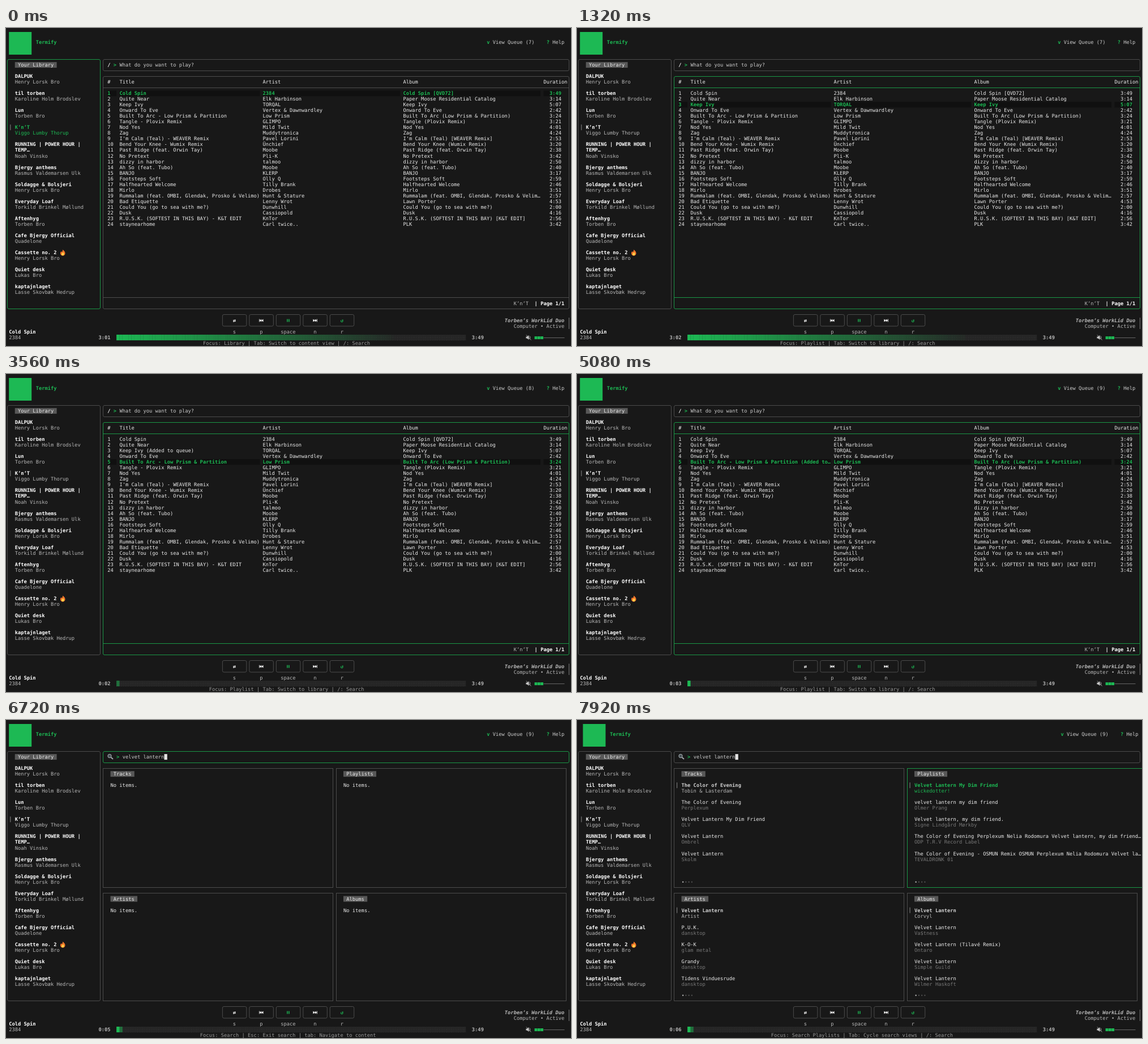
Write an HTML page that moves like this. It is 998 px wide and 561 px high and loops after 8000 ms.

```html
<!DOCTYPE html>
<html lang="en">
<head>
<meta charset="utf-8">
<title>Terminal music player</title>
<style>
html, body { margin: 0; width: 100%; height: 100%; overflow: hidden; background: #181818; }
svg { display: block; width: 998px; height: 561px; }
text { font: 8.762px "DejaVu Sans Mono", monospace; white-space: pre; text-rendering: geometricPrecision; }
.b { font-weight: bold; }
.i { font-weight: bold; font-style: italic; }
</style>
</head>
<body>
<svg id="stage" viewBox="0 0 998 561"></svg>
<script>
const LOOP = 8000, CELL = 5.275, LINE = 10.018;
const GREEN = '#1db954', WHITE = '#fff', TEXT = '#ececec', SOFT = '#b8b8b8', DIM = '#777', BACK = '#181818';
const EDGE = '#4c4c4c', ACTIVE_EDGE = '#1a9646';

// Library: title | owner; a slash breaks a long title
const library = `DALPUK;Henry Lorsk Bro
til torben;Karoline Holm Brodslev
Lun;Torben Bro
K’n’T;Viggo Lumby Thorup
RUNNING | POWER HOUR |/TEMP…;Noah Vinsko
Bjergy anthems;Rasmus Valdemarsen Ulk
Soldagge & Bolsjeri;Henry Lorsk Bro
Everyday Loaf;Torkild Brinkel Møllund
Aftenhyg;Torben Bro
Cafe Bjergy Official;Quadelone
Cassette no. 2;Henry Lorsk Bro
Quiet desk;Lukas Bro
kaptajnlaget;Lasse Skovbæk Hedrup`.split('\n').map(l => l.split(';'));

// Title; artist; album (blank = same as title); duration
const tracks = `Cold Spin;2384;Cold Spin [QVD72];3:49
Quite Near;Elk Harbinson;Paper Moose Residential Catalog;3:14
Keep Ivy;TORQAL;;5:07
Onward To Eve;Vertex & Dawnwardley;;2:42
Built To Arc - Low Prism & Partition;Low Prism;Built To Arc (Low Prism & Partition);3:24
Tangle - Plovix Remix;GLIMPO;Tangle (Plovix Remix);3:21
Nod Yes;Mild Twit;;4:01
Zag;Muddytronica;;4:24
I'm Calm (Teal) - WEAVER Remix;Pavel Lorini;I'm Calm (Teal) [WEAVER Remix];2:53
Bend Your Knee - Wumix Remix;Ünchief;Bend Your Knee (Wumix Remix);3:20
Past Ridge (feat. Orwin Tay);Moobe;;2:38
No Pretext;Pli-K;;3:42
dizzy in harbor;talmoo;;2:50
Ah So (feat. Tubo);Moobe;;2:40
BANJO;KLERP;;3:17
Footsteps Soft;Olly Q;;2:59
Halfhearted Welcome;Tilly Brank;;2:46
Mirlo;Drobes;;3:51
Rummalam (feat. OMBI, Glendak, Prosko & Velimo);Hunt & Stature;;2:57
Bad Etiquette;Lenny Wrot;Lawn Porter;4:53
Could You (go to sea with me?);Dunwhill;;2:00
Dusk;Cassiopold;;4:16
R.U.S.K. (SOFTEST IN THIS BAY) - K&T EDIT;KnTor;R.U.S.K. (SOFTEST IN THIS BAY) [K&T EDIT];2:56
staynearhome;Carl twice..;PLK;3:42`.split('\n').map(l => l.split(';'));

const query = 'velvet lantern';
const panels = [
  { name: 'Tracks', col: 32, row: 8, end: 29, items: `The Color of Evening;Tobin & Lasterdam
The Color of Evening;Perplexum
Velvet Lantern My Dim Friend;QLV
Velvet Lantern;Ombrel
Velvet Lantern;Skolm` },
  { name: 'Playlists', col: 110, row: 8, end: 29, items: `Velvet Lantern My Dim Friend;wickedotter!
velvet lantern my dim friend;Olmer Prang
Velvet lantern, my dim friend.;Signe Lindgård Mørkby
The Color of Evening Perplexum Nelia Rodomura Velvet lantern, my dim friend…;ODP T.R.V Record Label
The Color of Evening - OSMUN Remix OSMUN Perplexum Nelia Rodomura Velvet la…;TEVALDRONK 01` },
  { name: 'Artists', col: 32, row: 30, end: 49, items: `Velvet Lantern;Artist
P.U.K.;dansktop
K-O-K;glam metal
Grandy;dansktop
Tidens Vinduesrude;dansktop` },
  { name: 'Albums', col: 110, row: 30, end: 49, items: `Velvet Lantern;Corvyl
Velvet Lantern;Va$tness
Velvet Lantern (Tilavé Remix);Ontaro
Velvet Lantern;Simple Guild
Velvet Lantern;Wilmer Haskoft` }
];

// Values that hold from a given time on
const selectedAt = [[0, 1], [1240, 2], [1320, 3], [3280, 4], [3360, 5]];
const queueAt = [[0, 7], [2640, 8], [4600, 9]];
const playedAt = [[0, 181], [920, 182], [1800, 0], [2600, 1], [3560, 2], [4520, 3], [5520, 4], [6400, 5], [7280, 6]];
const focusAt = [[0, 'Library'], [200, 'Playlist'], [5320, 'Search'], [7840, 'Tracks'], [7920, 'Playlists']];
const valueAt = (steps, t) => steps.filter(s => s[0] <= t).pop()[1];

const burst = (t, start, count) => Math.max(0, Math.min(count, Math.floor((t - start) / 80) + 1));
const typedAt = t => burst(t, 5520, 7) + burst(t, 6160, 4) + burst(t, 6560, 3);

const x = col => 5.2 + col * CELL;
const y = row => 5 + row * LINE;
const escape = s => s.replace(/&/g, '&amp;').replace(/</g, '&lt;').replace(/>/g, '&gt;');
const clip = (s, n) => s.length > n ? s.slice(0, n - 1) + '…' : s;
const clock = s => `${Math.floor(s / 60)}:${String(s % 60).padStart(2, '0')}`;

const text = (col, row, s, fill = TEXT, cls = '', more = '') =>
  `<text x="${x(col).toFixed(2)}" y="${(y(row) + 3.1).toFixed(2)}" fill="${fill}" class="${cls}" ${more}>${escape(s)}</text>`;
const fillCells = (col, row, n, fill, opacity = 1) =>
  `<rect x="${x(col)}" y="${y(row) - 5}" width="${n * CELL}" height="10" fill="${fill}" opacity="${opacity}"/>`;
const box = (x1, y1, x2, y2, active, r = 2.5) =>
  `<rect x="${x1}" y="${y1}" width="${x2 - x1}" height="${y2 - y1}" rx="${r}" fill="none" stroke="${active ? ACTIVE_EDGE : EDGE}"/>`;
const line = (x1, y1, x2, y2, stroke) => `<path d="M${x1} ${y1}L${x2} ${y2}" stroke="${stroke}"/>`;
const marker = (col, row) => line(x(col + .5), y(row) - 5, x(col + .5), y(row) + 5, '#888');
const badge = (col, row, s) => fillCells(col, row, s.length + 2, '#585858') + text(col + 1, row, s);

const defs = `<defs><pattern id="hatch" width="2.6375" height="2.5" patternUnits="userSpaceOnUse">
<path d="M0 0h.9v.8h-.9zM1.3 1.25h.9v.8h-.9z" fill="#555"/></pattern></defs>`;
const flame = `<path d="M100 391c3 2 4.5 4 4.5 6.5a4 4 0 0 1-8.5 0c0-1.5.6-2.6 1.6-3.5l.8 1.5c1.3-1.2 1.9-2.7 1.6-4.5z" fill="#f5762a"/>
<path d="M100.5 395.5c1.5 1.4 2.2 2.4 2 3.6a2.2 2.2 0 0 1-4.4 0c0-1.4 1.9-1.8 2.4-3.6z" fill="#ffd54a"/>`;
const lens = `<g fill="none" stroke="#a9b0b4"><circle cx="183" cy="63.5" r="3.2" fill="#4a5358"/><path d="M185.5 66l3.5 3" stroke-width="1.8"/></g>`;
const speaker = `<path d="M918.5 544.5h2l3-2.5v8l-3-2.5h-2z" fill="#ccc"/><path d="M925 543.5q2 2.5 0 5M919 541.5l8.5 9" stroke="#ccc" fill="none" stroke-width=".8"/>`;

function header(t, shift) {
  return `<rect x="${x(shift)}" y="7" width="40" height="40" fill="${GREEN}"/>` +
    text(9 + shift, 2, 'Termify', GREEN, 'b') +
    text(160 + shift, 2, 'v', GREEN, 'b') + text(162 + shift, 2, `View Queue (${valueAt(queueAt, t)})`, '#ccc') +
    text(180 + shift, 2, '?', GREEN, 'b') + text(182 + shift, 2, 'Help', '#ccc');
}

function sidebar(focused) {
  let out = box(2.5, 55.5, 166.5, 495.5, focused) + badge(2, 6, 'Your Library');
  let row = 8;
  library.forEach(([title, owner], i) => {
    const active = focused && i === 3;
    if (i === 3) out += marker(0, row);
    if (i === 10) out += flame;
    for (const part of title.split('/')) out += text(2, row++, part, active ? GREEN : WHITE, 'b');
    out += text(2, row, owner, active ? GREEN : SOFT);
    row += 2;
  });
  return out;
}

function playlist(t, focused) {
  const edge = focused ? ACTIVE_EDGE : EDGE, selected = valueAt(selectedAt, t);
  const added = { 3: t >= 2440 && t < 5080, 5: t >= 4520 };
  let out = box(171.5, 55.5, 994.5, 75.5, false) + text(33, 6, '/', WHITE, 'b') + text(35, 6, '>', GREEN, 'b') +
    text(37, 6, 'What do you want to play?', '#ccc') +
    box(171.5, 85.5, 994.5, 495.5, focused) + line(171.5, 105.5, 994.5, 105.5, edge) + line(171.5, 475.5, 994.5, 475.5, edge) +
    text(33, 9, '#') + text(37, 9, 'Title') + text(85, 9, 'Artist') + text(132, 9, 'Album') + text(179, 9, 'Duration') +
    text(169, 48, 'K’n’T', SOFT) + text(176, 48, '| Page 1/1', WHITE, 'b');
  tracks.forEach(([title, artist, album, duration], i) => {
    const n = i + 1, row = i + 11, on = n === selected;
    const put = (col, s) => text(col, row, s, on ? GREEN : TEXT, on ? 'b' : '');
    if (on) out += [[33, 3], [37, 47], [85, 46], [132, 46], [179, 6]].map(([c, w]) => fillCells(c, row, w, '#101010')).join('');
    out += put(33, String(n)) + put(37, clip(title + (added[n] ? ' (Added to queue)' : ''), 47)) +
      put(85, artist) + put(132, clip(album || title, 46)) + put(181, duration);
  });
  return out;
}

function search(t, focus, loaded) {
  const n = typedAt(t), cursor = t < 7240 || t >= 7760;
  let out = box(171.5, 55.5, 994.5, 75.5, focus === 'Search') + lens + text(36, 6, '>', GREEN, 'b') +
    text(38, 6, n ? query.slice(0, n) : 'What do you want to play?', '#ccc');
  if (cursor) out += fillCells(38 + n, 6, 1, '#e4e4e4') + (n ? '' : text(38, 6, 'W', BACK));
  for (const { name, col, row, end, items } of panels) {
    const on = name === focus, left = col === 32 ? 171.5 : 583.5;
    const right = loaded && name === 'Playlists' ? 1010 : left + 406;
    out += box(left, Math.floor(y(row)) + .5, right, Math.floor(y(end)) + .5, on, 0) + badge(col + 2, row + 1, name);
    if (!loaded) { out += text(col + 2, row + 3, 'No items.'); continue; }
    items.split('\n').forEach((item, i) => {
      const [title, sub] = item.split(';'), r = row + 3 + i * 3, hot = on && !i;
      out += (i ? '' : marker(col, r)) +
        text(col + 2, r, title, hot ? GREEN : i ? TEXT : '#d0d0d0', i ? '' : 'b') +
        text(col + 2, r + 1, sub, hot ? GREEN : i ? DIM : SOFT);
    });
    out += text(col + 2, end - 1, '•', '#aaa') + text(col + 3, end - 1, '•••', '#4a4a4a');
  }
  return out;
}

function controls() {
  const skip = 'M-3.5-2.5L-.2 0L-3.5 2.5zM-.2-2.5L3 0L-.2 2.5zM2.8-2.5h1v5h-1z';
  const icon = (i, d, fill, sx = 1) => `<path transform="translate(${x(75.5 + i * 9)} 516) scale(${sx} 1)" d="${d}" fill="${fill}"/>`;
  const middle = 'text-anchor="middle"';
  return ['s', 'p', 'space', 'n', 'r'].map((key, i) => {
    const left = x(71.5 + i * 9);
    return box(left, 505.5, left + 42.5, 526, false) + text(75.5 + i * 9, 53, key, SOFT, '', middle);
  }).join('') + text(75.5, 51, '⇄', WHITE, 'b', middle) + icon(1, skip, WHITE, -1) +
    icon(2, 'M-2.2-2.5h1.5v5h-1.5zM.7-2.5h1.5v5h-1.5z', GREEN) + icon(3, skip, WHITE) +
    text(111.5, 51, '↺', GREEN, 'b', middle);
}

function player(t) {
  const played = valueAt(playedAt, t);
  const filled = played < 60 ? (played + 1 >> 1) / 2 : played / 229 * 117;
  let out = text(0, 53, 'Cold Spin', WHITE, 'b') + text(0, 54, '2384', SOFT) +
    text(30, 54, clock(played), SOFT, 'b') + text(155, 54, '3:49', SOFT, 'b') + fillCells(36, 54, 117, 'url(#hatch)');
  for (let i = 0; i < filled; i++) {
    out += fillCells(36 + i, 54, 1.03, GREEN, (Math.min(1, filled - i) * (1 - i / 95)).toFixed(3));
  }
  out += text(166, 51, 'Torben’s WorkLid Duo', SOFT, 'i') + text(169, 52, 'Computer • Active', SOFT) +
    line(994.5, 511, 994.5, 531, '#777') + speaker + line(949.5, 546.5, 986.5, 546.5, '#666');
  for (let i = 0; i < 3; i++) out += `<rect x="${x(176 + i)}" y="544" width="4.9" height="5" fill="${GREEN}"/>`;
  return out;
}

function status(focus, shift) {
  const s = {
    Library: 'Focus: Library | Tab: Switch to content view | /: Search',
    Playlist: 'Focus: Playlist | Tab: Switch to library | /: Search',
    Search: 'Focus: Search | Esc: Exit search | tab: Navigate to content'
  }[focus] || `Focus: Search ${focus} | Tab: Cycle search views | /: Search`;
  return text(Math.floor((187 - s.length) / 2) + shift, 55, s, '#999');
}

function render(t) {
  const focus = valueAt(focusAt, t), loaded = t >= 7880, shift = loaded ? 1 : 0;
  return defs + header(t, shift) + sidebar(focus === 'Library') +
    (t < 5320 ? playlist(t, focus === 'Playlist') : search(t, focus, loaded)) +
    controls() + player(t) + status(focus, shift);
}

const stage = document.getElementById('stage');
let shown = '';
function tick() {
  const picture = render(performance.now() % LOOP);
  if (picture !== shown) stage.innerHTML = shown = picture;
  requestAnimationFrame(tick);
}
tick();
</script>
</body>
</html>
```
